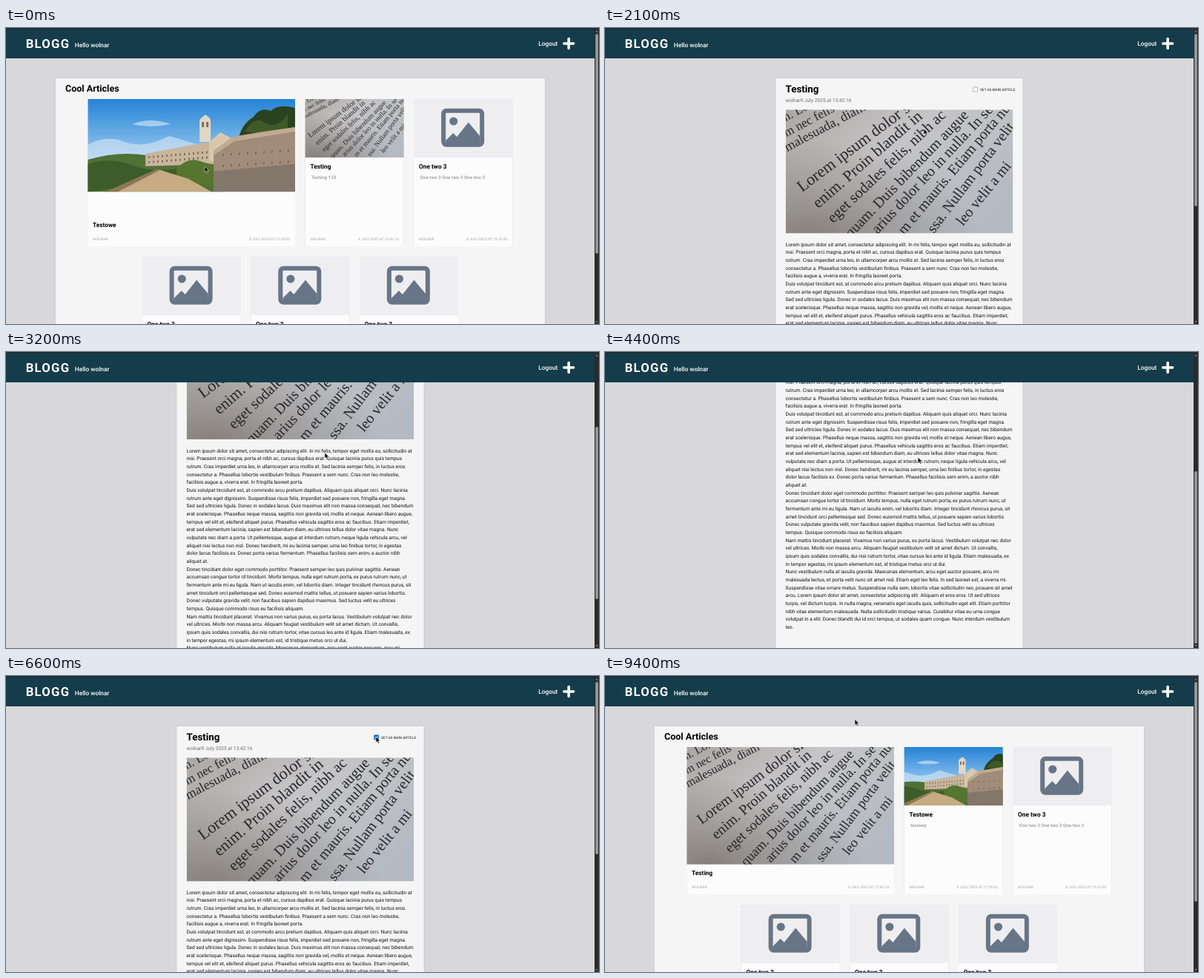
Write an HTML page that moves like this. It is 800x400 px and loops after 9.5 s.

```html
<!DOCTYPE html>
<html lang="en">
<head>
<meta charset="utf-8">
<title>Blog</title>
<style>
  html, body { margin: 0; height: 100%; overflow: hidden; background: #d8d8da; }
  svg#stage { display: block; width: 100vw; height: 100vh; }
  text { font-family: Roboto, sans-serif; text-rendering: geometricPrecision; white-space: pre; }
  .serif text { font-family: "Liberation Serif", serif; fill: #26262a; }
  .sheet { fill: #f5f5f5; filter: drop-shadow(0 0 1px #0002); }
  .card { fill: #fcfcfc; filter: drop-shadow(.3px .6px .6px #0003); }
</style>
</head>
<body>
<svg id="stage" viewBox="0 0 800 400">
  <defs>
    <linearGradient id="sky" x2="0" y2="1">
      <stop stop-color="#2583d6"/><stop offset=".65" stop-color="#9ccbf0"/>
    </linearGradient>
    <linearGradient id="paper" y2=".7">
      <stop stop-color="#aaa6a4"/><stop offset=".45" stop-color="#c6c5c6"/><stop offset="1" stop-color="#b4bac2"/>
    </linearGradient>
    <radialGradient id="shade" cx=".1" cy="1" r=".75">
      <stop stop-color="#716861" stop-opacity=".75"/><stop offset="1" stop-color="#716861" stop-opacity="0"/>
    </radialGradient>
    <symbol id="town" viewBox="0 0 280 125.5" preserveAspectRatio="xMidYMid slice"></symbol>
    <symbol id="print" viewBox="0 0 306.4 173.4" preserveAspectRatio="xMidYMid slice"></symbol>
    <symbol id="placeholder" viewBox="0 0 133 79">
      <rect width="133" height="79" fill="#eeeef0"/>
      <rect x="39.9" y="15.8" width="52" height="46" rx="4" fill="none" stroke="#687587" stroke-width="6"/>
      <circle cx="53.5" cy="30" r="5.6" fill="#687587"/>
      <path d="M43 59v-3l10-10 5 5 15.500-19.500L89 50v9z" fill="#687587"/>
    </symbol>
    <clipPath id="view"><rect y="41" width="794" height="359"/></clipPath>
  </defs>
  <rect width="800" height="400" fill="#d8d8da"/>
  <g clip-path="url(#view)">
    <g id="home"></g>
    <g id="homeSwapped"></g>
    <g id="article"></g>
  </g>
  <g id="header"></g>
  <rect x="794" width="6" height="400" fill="#2b2b2c"/>
  <path d="M795.500 5.500l1.500-2 1.500 2zM795.500 396l1.500 2 1.500-2z" fill="#9c9c9c"/>
  <rect id="thumb" x="795.2" width="3.7" rx="1.8" fill="#9b9b9b"/>
  <path id="cursor" d="M0 0v8l1.900-1.700 1.300 2.800 1.400-.6-1.300-2.800h2.500z" fill="#111" stroke="#fff" stroke-width=".5"/>
</svg>
<script>
const LOOP = 9500, STEP = 100, LINE = 10.667, MAX_SCROLL = 262;
const OPEN = 2100, CHECK = 6500, RETURN = 8500;
const USER = "wolnar";
const $ = id => document.getElementById(id);

const text = (x, y, size, content, { weight = 400, fill = "#111", extra = "" } = {}) =>
  `<text x="${x}" y="${y}" font-size="${size}" font-weight="${weight}" fill="${fill}" ${extra}>${content}</text>`;
const rect = (x, y, w, h, attrs) => `<rect x="${x}" y="${y}" width="${w}" height="${h}" ${attrs}/>`;
const shape = (d, fill) => `<path d="${d}" fill="${fill}"/>`;
const image = (id, x, y, w, h) => `<use href="#${id}" x="${x}" y="${y}" width="${w}" height="${h}"/>`;

// Illustrations
function windows(x, y, columns, rows, dx, dy, slope) {
  let d = "";
  for (let r = 0; r < rows; r++)
    for (let c = 0; c < columns; c++) d += `M${x + c * dx} ${y + r * dy + c * slope}h1.600v3h-1.600z`;
  return shape(d, "#6d6255");
}

$("town").innerHTML =
  rect(0, 0, 280, 126, 'fill="url(#sky)"') +
  shape("M0 62Q25 48 50 58T110 50L150 62 90 80 0 84zM60 34Q85 24 112 34 85 40 60 34z", "#cfe3f3aa") +
  shape("M0 82Q40 70 80 76L180 70V126H0z", "#4f7136") +
  shape("M0 88Q30 78 62 90T130 92L110 110 0 126z", "#3c5d2a") +
  shape("M78 74L120 66 152 60 174 58V88L78 91z", "#c9b59c") +
  windows(82, 77, 15, 2, 6, 7, -.5) +
  shape("M151 58V28l3-3 5-4 5 4 2 3V58z", "#e2d6c2") +
  shape("M154 31h3v7h-3zM160 31h3v7h-3z", "#7b7265") +
  shape("M164 58l15-13 17 9V84H164z", "#d8c8b0") +
  shape("M204 52Q208 34 224 24 233 10 247 16 258 6 280 12V56H204z", "#29421f") +
  shape("M212 44Q225 22 240 32T270 20V50z", "#3d5a28") +
  shape("M120 94Q135 78 152 84T178 88V118H120z", "#56752f") +
  shape("M170 70L196 51 236 44 280 38V126H170z", "#a08c79") +
  shape("M170 70L196 51 280 38V44L198 57 170 76z", "#c0aa91") +
  shape("M170 98L280 88V126H170z", "#83776b") +
  windows(182, 74, 9, 2, 11, 15, -.7) +
  shape("M24 126L94 95 136 108 168 126z", "#c6ab83") +
  shape("M24 126L94 95l4 1-58 30z", "#8e7656");

const printLines = [
  [0, 19, -28, 17, "n. Lorem"],
  [1, 40, -28, 17, "m nec felis"],
  [2, 60, -28, 18, "malesuada, diam"],
  [22, 115, -37, 22, "Lorem ipsum dolor sit"],
  [44, 137, -41, 21.5, "enim. Proin blandit in"],
  [64, 157, -43.5, 20.6, "eget sodales felis, nibh ac"],
  [88, 177, -46, 20, "quam. Duis bibendum augue"],
  [124, 172, -47, 20, "arius dolor leo in nulla. In se"],
  [160, 173, -50, 20, "m et mauris. Etiam porta nulla"],
  [200, 171, -53, 20, "ssa. Nullam porta velit"],
  [239, 161, -51, 20, "leo velit a mi"]
];
$("print").innerHTML = rect(0, 0, 307, 174, 'fill="url(#paper)"') + rect(0, 0, 307, 174, 'fill="url(#shade)"') +
  `<g class="serif">${printLines.map(([x, y, angle, size, line]) =>
    `<text transform="translate(${x} ${y}) rotate(${angle})" font-size="${size}">${line}</text>`).join("")}</g>`;

// Pages
function card(x, y, { width = 133, picture = "placeholder", pictureHeight = 79, title, note = "", date, titleY = 94 }) {
  const small = { fill: "#a5a5a5" };
  return rect(x, y, width, 199, 'class="card"') +
    image(picture, x, y, width, pictureHeight) +
    text(x + 6.7, y + titleY, 8.333, title, { weight: 700, fill: "#000" }) +
    text(x + 8.3, y + 108.3, 6.25, note, { weight: 700, fill: "#a5a5a5" }) +
    text(x + 6.7, y + 190.6, 5, USER.toUpperCase(), small) +
    text(x + width - 6.7, y + 190.6, 5, date, { ...small, extra: 'text-anchor="end"' });
}

const town = { picture: "town", title: "Testowe", note: "testowy", date: "8 JULY 2025 AT 17:29:52" };
const print = { picture: "print", title: "Testing", note: "Testing 123", date: "9 JULY 2025 AT 13:42:16" };
const blank = { title: "One two 3", note: "One two 3 One two 3 One two 3", date: "8 JULY 2025 AT 15:37:43" };

function homePage(main, second, mainHeight) {
  return rect(66.7, 68, 660.3, 400, 'class="sheet"') +
    text(80, 86, 12.5, "Cool Articles", { weight: 700, fill: "#000" }) +
    card(110.3, 96, { ...main, width: 279.7, pictureHeight: mainHeight, titleY: 173.3, note: "" }) +
    card(403.7, 96, second) +
    card(550.3, 96, blank) +
    [183.7, 330.4, 477].map(x => card(x, 309, blank)).join("");
}
$("home").innerHTML = homePage(town, print, 125.3);
$("homeSwapped").innerHTML = homePage(print, town, 158.4);

const body = `Lorem ipsum dolor sit amet, consectetur adipiscing elit. In mi felis, tempor eget mollis eu, sollicitudin at
nisi. Praesent orci magna, porta et nibh ac, cursus dapibus erat. Quisque lacinia purus quis tempus
rutrum. Cras imperdiet urna leo, in ullamcorper arcu mollis et. Sed lacinia semper felis, in luctus eros
consectetur a. Phasellus lobortis vestibulum finibus. Praesent a sem nunc. Cras non leo molestie,
facilisis augue a, viverra erat. In fringilla laoreet porta.
Duis volutpat tincidunt est, at commodo arcu pretium dapibus. Aliquam quis aliquet orci. Nunc lacinia
rutrum ante eget dignissim. Suspendisse risus felis, imperdiet sed posuere non, fringilla eget magna.
Sed sed ultricies ligula. Donec in sodales lacus. Duis maximus elit non massa consequat, nec bibendum
erat scelerisque. Phasellus neque massa, sagittis non gravida vel, mollis et neque. Aenean libero augue,
tempus vel elit et, eleifend aliquet purus. Phasellus vehicula sagittis eros ac faucibus. Etiam imperdiet,
erat sed elementum lacinia, sapien est bibendum diam, eu ultrices tellus dolor vitae magna. Nunc
vulputate nec diam a porta. Ut pellentesque, augue at interdum rutrum, neque ligula vehicula arcu, vel
aliquet nisi lectus non nisl. Donec hendrerit, mi eu lacinia semper, urna leo finibus tortor, in egestas
dolor lacus facilisis ex. Donec porta varius fermentum. Phasellus facilisis sem enim, a auctor nibh
aliquet at.
Donec tincidunt dolor eget commodo porttitor. Praesent semper leo quis pulvinar sagittis. Aenean
accumsan congue tortor id tincidunt. Morbi tempus, nulla eget rutrum porta, ex purus rutrum nunc, ut
fermentum ante mi eu ligula. Nam ut iaculis enim, vel lobortis diam. Integer tincidunt rhoncus purus, sit
amet tincidunt orci pellentesque sed. Donec euismod mattis tellus, ut posuere sapien varius lobortis.
Donec vulputate gravida velit, non faucibus sapien dapibus maximus. Sed luctus velit eu ultrices
tempus. Quisque commodo risus eu facilisis aliquam.
Nam mattis tincidunt placerat. Vivamus non varius purus, eu porta lacus. Vestibulum volutpat nec dolor
vel ultrices. Morbi non massa arcu. Aliquam feugiat vestibulum velit sit amet dictum. Ut convallis,
ipsum quis sodales convallis, dui nisi rutrum tortor, vitae cursus leo ante id ligula. Etiam malesuada, ex
in tempor egestas, mi ipsum elementum est, id tristique metus orci ut dui.
Nunc vestibulum nulla at iaculis gravida. Maecenas elementum, arcu eget auctor posuere, arcu mi
malesuada lectus, et porta velit nunc sit amet nisl. Etiam eget leo felis. In sed laoreet est, a viverra mi.
Suspendisse vitae ornare metus. Suspendisse nulla sem, lobortis vitae sollicitudin nec, posuere sit amet
arcu. Lorem ipsum dolor sit amet, consectetur adipiscing elit. Aliquam et eros eros. Ut sed ultrices
turpis, vel dictum turpis. In nulla magna, venenatis eget iaculis quis, sollicitudin eget elit. Etiam porttitor
nibh vitae elementum malesuada. Nulla sollicitudin tristique varius. Curabitur vitae eu urna congue
volutpat in a elit. Donec blandit dui id orci tempus, ut sodales quam congue. Nunc interdum vestibulum
leo.`.split("\n");

$("article").innerHTML =
  rect(230.4, 68, 333.3, 610, 'class="sheet"') +
  text(243.6, 87.2, 13.333, "Testing", { weight: 700, fill: "#000" }) +
  text(243.6, 100.4, 6.667, USER + "9 July 2025 at 13:42:16", { fill: "#6b6b6b" }) +
  rect(496.7, 79.9, 6, 6, 'rx="1" fill="#fff" stroke="#777" stroke-width=".6"') +
  `<g id="tick">${rect(496.4, 79.6, 6.6, 6.600, 'rx="1" fill="#1a6fd8"')}
    <path d="M497.800 83l1.300 1.400 2.600-3" fill="none" stroke="#fff"/></g>` +
  text(506.2, 84.5, 4.667, "SET AS MAIN ARTICLE") +
  image("print", 243.7, 110.5, 306.5, 166.7) +
  body.map((line, i) => text(243.6, 294.8 + i * LINE, 6.667, line)).join("");

$("header").innerHTML =
  rect(0, 0, 800, 41, 'fill="#143c4a"') + rect(0, 0, 800, 1.2, 'fill="#242628"') +
  text(26.7, 26.8, 16.667, "BLOGG", { weight: 700, fill: "#fff", extra: 'letter-spacing="1.25"' }) +
  text(92.8, 25.9, 8.333, "Hello " + USER, { weight: 500, fill: "#fff" }) +
  text(718.2, 23.9, 8.333, "Logout", { weight: 500, fill: "#fff" }) +
  `<path d="M752.800 21h12.800M759.200 14.600v12.800" stroke="#fff" stroke-width="3.6" stroke-linecap="round"/>`;

// Motion
const smooth = p => (1 - Math.cos(Math.PI * p)) / 2;
const progress = (t, from, to) => Math.min(1, Math.max(0, (t - from) / (to - from)));
const scrollAt = t => MAX_SCROLL * (smooth(progress(t, 2540, 3700)) - progress(t, 4500, 5260));

const path = [ // time, x, y
  [0, 268, 187], [500, 272, 188], [1600, 430, 136], [3200, 430, 136], [3900, 430, 136], [4200, 422, 142],
  [5200, 424, 144], [6200, 499, 82], [6800, 499, 82], [7900, 90.500, 30], [8200, 58, 21], [8600, 58, 21], [9400, 337, 58.500]
];
function cursorAt(t) {
  const next = path.findIndex(point => point[0] > t);
  if (next < 0) return path.at(-1).slice(1);
  const [t0, x0, y0] = path[next - 1], [t1, x1, y1] = path[next];
  const p = smooth(progress(t, t0, t1));
  return [x0 + (x1 - x0) * p, y0 + (y1 - y0) * p];
}

function show(id, visible) { $(id).style.display = visible ? "" : "none"; }

function render() {
  const t = Math.floor(performance.now() % LOOP / STEP) * STEP;
  const reading = t >= OPEN && t < RETURN;
  const scroll = scrollAt(t);
  show("home", t < OPEN);
  show("article", reading);
  show("homeSwapped", t >= RETURN);
  show("tick", t >= CHECK);
  $("article").setAttribute("transform", `translate(0 ${-scroll})`);
  $("thumb").setAttribute("y", 8 + (reading ? scroll * .584 : 0));
  $("thumb").setAttribute("height", reading ? 233 : 297);
  $("cursor").setAttribute("transform", `translate(${cursorAt(t)})`);
  requestAnimationFrame(render);
}
render();
</script>
</body>
</html>
```
